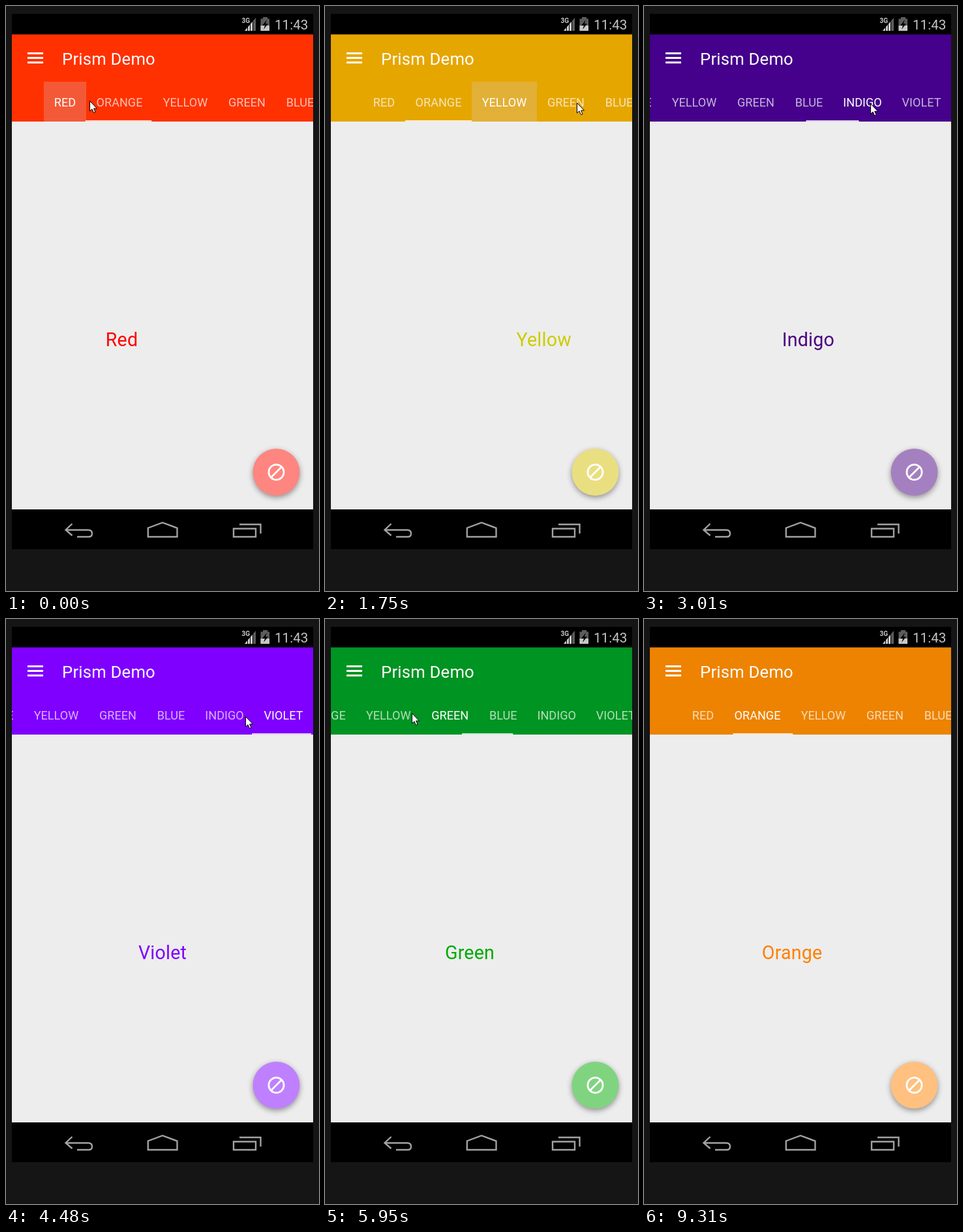
Write an HTML page that moves like this. It is 480x896 px and loops after 9.73 s.

```html
<!DOCTYPE html>
<html lang="en">
<head>
<meta charset="utf-8">
<title>Colour tabs</title>
<style>
  html, body { margin: 0; width: 100%; height: 100%; overflow: hidden; background: #151515; }
  svg { display: block; width: 480px; height: 896px; font-family: Roboto, sans-serif; }
  .tab { font-size: 18.1px; fill: #fff; text-anchor: middle; }
  .page { font-size: 28.6px; letter-spacing: .2px; text-anchor: middle; }
  .nav { fill: none; stroke: #a2a2a2; stroke-width: 2.4; }
  #fab { filter: drop-shadow(0 3px 4px rgba(0, 0, 0, .4)); }
</style>
</head>
<body>
<svg viewBox="0 0 480 896">
  <clipPath id="screen"><rect x="9" y="12" width="462" height="820"/></clipPath>
  <rect width="480" height="896" fill="#151515"/>
  <g clip-path="url(#screen)">
    <rect x="9" y="12" width="462" height="820"/>
    <rect x="9" y="177" width="462" height="594" fill="#ededed"/>
    <g id="pages"></g>

    <rect id="header" x="9" y="43.5" width="462" height="133.5"/>
    <path d="M33 71h24v3h-24zM33 78h24v3h-24zM33 85h24v3h-24z" fill="#fff"/>
    <text x="86" y="90" font-size="25.7" letter-spacing=".2" fill="#fff">Prism Demo</text>
    <g id="tabs">
      <rect id="press" y="116" height="61" fill="rgba(212,205,212,.26)"/>
      <rect id="bar" y="175" height="2" fill="#fff" opacity=".8"/>
    </g>

    <!-- status bar -->
    <path d="M366 38L383 18V38Z" fill="#5c5c5c"/>
    <path d="M366 38L378 24V38Z" fill="#d0d0d0"/>
    <path d="M370.5 20v18M374.5 20v18M378.5 20v18" stroke="#000"/>
    <text x="361.5" y="26" font-size="10" font-weight="700" fill="#c8c8c8" stroke="#000" stroke-width="2" paint-order="stroke">3G</text>
    <path d="M394 17h7v2.5h3v18.5h-13.5v-18.5h3.5z" fill="#5c5c5c"/>
    <path d="M390.5 30h13.5v8h-13.5z" fill="#c8c8c8"/>
    <path d="M400 21l-7 9h4l-2 6 7-9h-4z" fill="#000"/>
    <text x="412" y="36" font-size="20.6" fill="#c4c4c4">11:43</text>

    <!-- navigation bar -->
    <path class="nav" d="M101.5 793L91.5 802.500L101.500 811M92 802.500H126Q132 802.500 132 808T126 813H109"/>
    <path class="nav" d="M217.800 813V799.500L240 791.200L262.500 799.500V813Z"/>
    <path class="nav" d="M349 800.500H383V813H349ZM358 794H390.500V808"/>

    <circle id="fab" cx="414.500" cy="714" r="36"/>
    <g fill="none" stroke="#fff" stroke-width="2.7">
      <circle cx="414.500" cy="714" r="11.600"/>
      <path d="M406.500 722L422.500 706"/>
    </g>
  </g>
  <path id="cursor" d="M.5 .5V16L4 12.800L6.500 18.500L9 17.500L6.600 12H11.500Z" fill="#fff" stroke="#000"/>
</svg>
<script>
const LOOP = 9730, TICK = 70, WIDTH = 462, MID = 240, MAX_SCROLL = 198, HOME = 1;
const names = ['Red', 'Orange', 'Yellow', 'Green', 'Blue', 'Indigo', 'Violet'];
const colors = [0xff0000, 0xff8000, 0xcccc00, 0x00aa00, 0x0000ff, 0x4b0082, 0x7f00ff]
  .map(c => [16, 8, 0].map(shift => c >> shift & 255));
const edges = [58, 123, 225, 325, 414, 488, 578, 669];

// refresh start and end, pointer goal x and y, then for screen refreshes: tap time and page
const moves = [
  [0, 0, 128, 145, -172, 0],
  [140, 350, 155, 143],
  [490, 560, 160, 143],
  [910, 1260, 230, 148, 880, 1],
  [1470, 1750, 386, 148, 1601, 2],
  [2030, 2450, 362, 149, 2100, 4],
  [2660, 2730, 338, 149],
  [2940, 3430, 400, 151, 2765, 5],
  [3710, 3990, 408, 150, 3610, 6],
  [4200, 4270, 372, 149],
  [4410, 4480, 367, 149],
  [4830, 5180, 300, 148, 4770, 5],
  [5390, 5740, 133, 144, 5350, 4],
  [5880, 6090, 133, 144, 5721, 3],
  [6300, 6720, 70, 147, 6471, 1],
  [7140, 7350, 91, 155],
  [7770, 7840, 92, 148],
  [8050, 8260, 95, 144],
  [8610, 9310, 410, 900]
].map(([start, end, x, y, tap, page]) => ({ start, end, x, y, tap, page }));
const taps = moves.filter(m => m.page !== undefined);

const $ = id => document.getElementById(id);
const clamp = v => Math.min(1, Math.max(0, v));
const mix = (a, b, p) => a + (b - a) * p;
const mixAll = (a, b, p) => a.map((v, i) => mix(v, b[i], p));
const rgb = c => `rgb(${c.map(Math.round)})`;
const pale = c => c.map(v => (v + 255) / 2);
const smooth = t => (1 - Math.cos(Math.PI * t)) / 2;
const settle = t => 1 - (1 - t) ** 5;
const bounds = i => [edges[i], edges[i + 1]];
const center = i => (edges[i] + edges[i + 1]) / 2;
const scrollFor = i => Math.min(MAX_SCROLL, Math.max(0, center(i) - MID));

// cubic-bezier(.4, 0, .2, 1)
function fastOutSlowIn(x) {
  let lo = 0, hi = 1;
  for (let i = 0; i < 20; i++) {
    const s = (lo + hi) / 2, r = 1 - s;
    if (1.2 * r * r * s + 0.6 * r * s * s + s ** 3 < x) lo = s; else hi = s;
  }
  return lo * lo * (3 - 2 * lo);
}

// the picture only refreshes on ticks inside a move
function snap(t, list) {
  const { start, end } = list.filter(m => m.start <= t).pop();
  return start + Math.floor(Math.min(t - start, end - start) / TICK) * TICK;
}

function addText(parent, cls, text, y) {
  const el = document.createElementNS('http://www.w3.org/2000/svg', 'text');
  el.setAttribute('class', cls);
  el.setAttribute('y', y);
  el.textContent = text;
  return parent.appendChild(el);
}

const tabs = names.map((name, i) => {
  const el = addText($('tabs'), 'tab', name.toUpperCase(), 153.5);
  el.setAttribute('x', center(i));
  return el;
});
const pages = names.map((name, i) => {
  const el = addText($('pages'), 'page', name, 521);
  el.setAttribute('fill', rgb(colors[i]));
  return el;
});

function place(el, [left, right]) {
  el.setAttribute('x', left);
  el.setAttribute('width', right - left);
}

// the bar of a far jump grows from a point just beside its goal
function barStart(from, to, far) {
  if (!far) return bounds(from);
  const x = to > from ? edges[to] - 31 : edges[to + 1] + 31;
  return [x, x];
}

function drawScreen(t) {
  const n = taps.filter(m => m.tap <= t).length - 1;
  const { tap, page: to } = taps[n];
  const from = n ? taps[n - 1].page : HOME;
  const distance = Math.abs(to - from), far = distance > 1;
  const age = t - tap;

  const tint = smooth(clamp(age / 300));
  $('header').setAttribute('fill', rgb(mixAll(colors[from], colors[to], tint)));
  $('fab').setAttribute('fill', rgb(mixAll(pale(colors[from]), pale(colors[to]), 1 - (1 - tint) ** 2.5)));

  const at = mix(from, to, settle(clamp((age - 45) / (415 - 30 * distance))));
  pages.forEach((el, i) => el.setAttribute('x', MID + (i - at) * WIDTH));

  const slide = fastOutSlowIn(clamp((age - (far ? 60 : 147)) / 300));
  const scroll = mix(scrollFor(from), scrollFor(to), far ? 1 : slide);
  place($('bar'), mixAll(barStart(from, to, far), bounds(to), slide));
  place($('press'), bounds(to));
  $('press').setAttribute('visibility', age < 200 ? 'visible' : 'hidden');
  $('tabs').setAttribute('transform', `translate(${-scroll} 0)`);
  tabs.forEach((el, i) => el.setAttribute('fill-opacity', i === to ? 1 : 0.7));
}

function drawPointer(t) {
  const i = moves.filter(m => m.start <= t).length - 1;
  const goal = moves[i], last = moves[Math.max(0, i - 1)];
  const p = smooth(clamp((t - goal.start + TICK) / (goal.end - goal.start + TICK)));
  $('cursor').setAttribute('transform', `translate(${mix(last.x, goal.x, p)} ${mix(last.y, goal.y, p)})`);
}

function frame() {
  const t = performance.now() % LOOP;
  drawScreen(snap(t, taps));
  drawPointer(snap(t, moves));
  requestAnimationFrame(frame);
}
frame();
</script>
</body>
</html>
```
